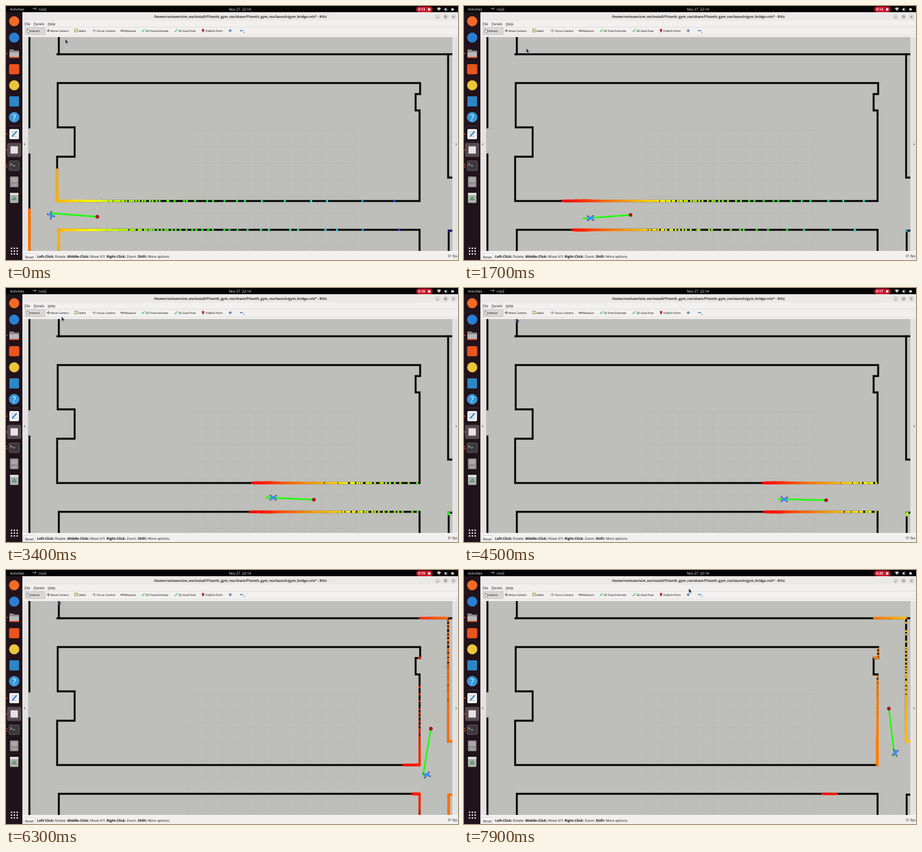
These frames come from a looping animation (800x450 px, 8 s). An HTML page with a canvas:

```html
<!DOCTYPE html>
<html lang="en">
<head>
<meta charset="utf-8">
<title>Lidar simulation</title>
<style>
html, body { margin: 0; width: 100%; height: 100%; overflow: hidden; background: #000; }
svg, canvas { position: absolute; left: 0; top: 0; width: 800px; height: 450px; }
text { font-family: "Open Sans", "Noto Sans", sans-serif; text-rendering: geometricPrecision; white-space: pre; }
.bar { font-size: 6.2px; fill: #f2f2f2; }
.menu { font-size: 6.2px; fill: #111; }
.tool { font-size: 4.95px; fill: #000; }
.status { font-size: 6.08px; fill: #111; }
.b { font-weight: 700; }
</style>
</head>
<body>
<svg viewBox="0 0 800 450">
  <!-- desktop bar -->
  <rect width="800" height="450" fill="#050404"/>
  <text class="bar" x="7" y="8">Activities</text>
  <path d="M47 4.5h6M51 2.5l2.5 2-2.5 2.5" stroke="#bbb" stroke-width=".8" fill="none"/>
  <text class="bar" x="58" y="8">rviz2</text>
  <text class="bar" x="414" y="8" text-anchor="middle">Nov 27  22:14</text>
  <rect x="726" y="1" width="29" height="10" rx="5" fill="#c9162b"/>
  <text id="timer" class="bar b" x="729.5" y="8.2">0:13</text>
  <rect x="747" y="4" width="4" height="4" rx=".6" fill="#fff"/>
  <g fill="#ccc">
    <path d="M762.5 4q3.8-3 7.6 0l-3.8 4.6z"/>
    <path d="M776 4.5h1.6l2-2v7l-2-2H776zM781 4q1.5 2 0 4"/>
    <path d="M788 4h4v4h-4zM792 5h1v2h-1z"/>
  </g>

  <!-- dock -->
  <rect y="11" width="29" height="439" fill="#21131b"/>
  <rect x="2" y="242.5" width="25" height="25" rx="3" fill="#574a51"/>
  <circle cx="14.5" cy="27" r="9" fill="#f26a26"/>
  <circle cx="14.5" cy="56" r="9" fill="#2b7fd0"/>
  <path d="M6 77h7l2 2h8v13H6z" fill="#8a8789"/><path d="M6 82h17v10H6z" fill="#b9b6b7"/><path d="M6 90h17v2H6z" fill="#e2582a"/>
  <rect x="5.5" y="103" width="18" height="18" rx="3" fill="#e9541f"/>
  <circle cx="14.5" cy="140.5" r="9" fill="#e9c63a"/>
  <rect x="6" y="160" width="17" height="18" rx="1" fill="#2d86c5"/>
  <circle cx="14.5" cy="197" r="9.3" fill="#3a97d8"/>
  <text x="14.5" y="202.5" font-size="15" fill="#fff" text-anchor="middle">?</text>
  <path d="M5 212.5h19" stroke="#54454d" stroke-width=".8"/>
  <rect x="6" y="218" width="17" height="18" rx="2" fill="#f1f1f1"/>
  <path d="M9 223h8M9 227h6M9 231h10" stroke="#b7b7b7"/><path d="M11 231l8-9" stroke="#3583d6" stroke-width="2.5"/>
  <rect x="8" y="248.5" width="13" height="13" fill="#e4e2e3"/>
  <rect x="5.5" y="274.5" width="18" height="17" rx="2" fill="#3b383b" stroke="#777278" stroke-width=".8"/>
  <path d="M8 279l2.5 1.7L8 282.5M12 283h4" stroke="#eee" fill="none"/>
  <rect x="7" y="302" width="15" height="19" rx="1.5" fill="#8e8b8d"/><rect x="9" y="304" width="11" height="8" fill="#aaa7a9"/>
  <text x="14.5" y="318.5" font-size="5" fill="#ddd" text-anchor="middle">SSD</text>
  <rect x="7" y="331" width="15" height="18" rx="2" fill="#a9b0aa"/><path d="M7 331h15v4H7z" fill="#dedfdc"/>
  <path d="M11.5 343l3-5 3 5z" fill="none" stroke="#3d8b59" stroke-width="1.4"/>
  <path d="M1.5 84h0M1.5 227h0M1.5 255h0M1.5 281h0M1.5 285h0" stroke="#e95420" stroke-width="2.2" stroke-linecap="round"/>
  <g id="apps" fill="#f4f4f4"></g>

  <!-- window -->
  <rect x="29" y="11" width="771" height="439" fill="#f1f0ef"/>
  <rect x="29" y="11" width="771" height="15" fill="#ebe9e8"/>
  <text class="b" x="414.5" y="21" font-size="5.97" fill="#2e2e2e" text-anchor="middle">/home/rovinam/sim_ws/install/f1tenth_gym_ros/share/f1tenth_gym_ros/launch/gym_bridge.rviz* - RViz</text>
  <path d="M764 19h0M778 19h0M792 19h0" stroke="#dcdad8" stroke-width="10" stroke-linecap="round"/>
  <path d="M762.5 20.5h3M776.5 17.5h3v3h-3zM790.5 17.5l3 3m0-3l-3 3" stroke="#555" stroke-width=".7" fill="none"/>
  <g class="menu"><text x="33" y="33.5">File</text><text x="49" y="33.5">Panels</text><text x="74" y="33.5">Help</text></g>
  <path d="M33 34.8h3M49 34.8h3.5M74 34.8h4" stroke="#222" stroke-width=".5"/>
  <path d="M29 37.5h771M29 51.5h771" stroke="#dad8d7" stroke-width=".7"/>
  <rect x="34" y="38" width="35.5" height="12.5" rx="1" fill="#d9d7d6" stroke="#bcbab9" stroke-width=".6"/>
  <g id="tools" class="tool"></g>
  <path d="M37 41v4l1.5 2h3v-4l-3-.5V41z" fill="#fff" stroke="#444" stroke-width=".6"/>
  <path d="M72 43.7h6M75 40.7v6" stroke="#777" stroke-width="1.5"/>
  <rect x="121.5" y="41" width="5" height="5" fill="#e8e8b0" stroke="#778b32" stroke-width=".8"/>
  <path d="M153 43.7h6.5M156.2 40.5V47" stroke="#888"/>
  <rect x="202.5" y="42.5" width="7" height="2.8" fill="#8d8d85"/>
  <path d="M240.5 46l5-4.5M298.5 46l5-4.5" stroke="#18cf2c" stroke-width="1.3"/>
  <path d="M348.7 47.500l-2-4a2.200 2.200 0 1 1 4 0z" fill="#b8232d"/>
  <path d="M394 43.7h5.6M396.8 41v5.5M414 43.7h5.6" stroke="#4d81b4" stroke-width="1.7"/>
  <path d="M420 46.5h2.400l-1.200 1.400z" fill="#444"/>
  <path d="M29 55h10v379H29zM790 55h10v379H790z" fill="#e4e3e1"/>
  <rect x="39" y="55" width="751" height="379" fill="#bebeba"/>
  <path d="M33.5 243v4l-2-2zM796 243v4l2-2z" fill="#555"/>
  <path d="M29 434.5h771" stroke="#fafafa"/>
  <rect x="31" y="438.5" width="20" height="10.5" rx="1.5" fill="#f7f6f5" stroke="#c7c5c3" stroke-width=".6"/>
  <text class="status" x="33.500" y="446.5">Reset</text>
  <text class="status" x="55" y="446"><tspan class="b">Left-Click:</tspan> Rotate. <tspan class="b">Middle-Click:</tspan> Move X/Y. <tspan class="b">Right-Click:</tspan> Zoom. <tspan class="b">Shift:</tspan> More options.</text>
  <text class="status" x="799" y="445" text-anchor="end">31 fps</text>
</svg>
<canvas id="view"></canvas>
<script>
const LOOP = 8000, STEP = 100, RAD = Math.PI / 180;
const BEAMS = 1080, FOV = 270 * RAD, RANGE = 885, LOOKAHEAD = 85;

// time, x, y
const ROUTE = [[0, 77, 367], [1000, 133, 385], [2300, 293, 370], [3400, 460, 371],
  [4500, 556, 374], [6300, 738, 365], [7900, 762, 330]];
const POINTER = [[0, 105, 59], [1400, 105, 59], [2300, 125.5, 122], [3400, 98.5, 51],
  [4300, 93, 54], [7000, 93, 54], [7800, 398, 33]];

// the line whose points the car chases
const RACELINE = [[60, 374], [218, 373], [380, 367], [542, 375], [752, 377], [752, 60]];

// corridor walls; some run on outside the view
const WALLS = [
  [[41.5, -200], [41.5, 215]],
  [[41.5, 263], [41.5, 470], [-50, 470], [-50, 900]],
  [[93.5, -200], [93.5, 85.5]],
  [[91, 85.5], [900, 85.5]],
  [[782.5, 85.5], [782.5, 304], [900, 304]],
  [[91.5, 136.5], [733, 136.5], [733, 156], [725, 156], [725, 185], [732, 185], [732, 345.5],
   [90.5, 345.5], [90.5, 267], [121.5, 267], [121.5, 215], [91.5, 215], [91.5, 136.5]],
  [[93.5, 900], [93.5, 396.5], [732, 396.5], [732, 900]],
  [[783.5, 900], [783.5, 398], [900, 398]]
];
const segments = line => line.slice(1).map((p, i) => [...line[i], ...p]);
const EDGES = WALLS.flatMap(segments);
const clamp = (v, lo, hi) => Math.max(lo, Math.min(hi, v));

// monotone cubic through timed points
function sample(rows, t) {
  const last = rows.length - 1;
  let i = 0;
  while (i < last - 1 && t >= rows[i + 1][0]) i++;
  const h = rows[i + 1][0] - rows[i][0], u = clamp((t - rows[i][0]) / h, 0, 1);
  return [1, 2].map(c => {
    const slope = j => (rows[j + 1][c] - rows[j][c]) / (rows[j + 1][0] - rows[j][0]);
    const tangent = j => {
      if (j === 0) return slope(0);
      if (j === last) return slope(last - 1);
      const a = slope(j - 1), b = slope(j);
      return a * b <= 0 ? 0 : 2 * a * b / (a + b);
    };
    const p = rows[i][c], q = rows[i + 1][c], v = u * u, w = v * u;
    return p * (2 * w - 3 * v + 1) + q * (3 * v - 2 * w)
      + h * (tangent(i) * (w - 2 * v + u) + tangent(i + 1) * (w - v));
  });
}

// leave the first corner, sway down the corridor, turn into the next one
function headingAt(t) {
  const leave = 55 * (1 - clamp(t / 1000, 0, 1)) ** 1.3;
  const sway = -3.5 * Math.sin(Math.PI * (clamp(t, 900, 4900) - 900) / 2000);
  const turn = -78 * clamp((t - 5300) / 2600, 0, 1) ** 1.7;
  return (leave + sway + turn) * RAD;
}

// furthest point of the race line at the lookahead distance
function goalFrom(x, y) {
  for (const [ax, ay, bx, by] of segments(RACELINE).reverse()) {
    const dx = bx - ax, dy = by - ay, fx = ax - x, fy = ay - y;
    const a = dx * dx + dy * dy, b = fx * dx + fy * dy;
    const s = (-b + Math.sqrt(b * b - a * (fx * fx + fy * fy - LOOKAHEAD ** 2))) / a;
    if (s >= 0 && s <= 1) return [ax + s * dx, ay + s * dy];
  }
}

// distance along a ray to the nearest wall
function cast(x, y, dx, dy) {
  let best = Infinity;
  for (const [ax, ay, bx, by] of EDGES) {
    const ex = bx - ax, ey = by - ay, det = dx * ey - dy * ex;
    if (Math.abs(det) < 1e-9) continue;
    const d = ((ax - x) * ey - (ay - y) * ex) / det;
    const s = ((ax - x) * dy - (ay - y) * dx) / det;
    if (d > 0 && d < best && s >= 0 && s <= 1) best = d;
  }
  return best;
}

// red, yellow, green, cyan, blue, magenta
const rainbow = v => `hsl(${clamp(v, 0, 1) * 300} 100% 50%)`;

function noise(n) {
  const s = Math.sin(n * 12.9898) * 43758.5453;
  return s - Math.floor(s) - 0.5;
}

const canvas = document.getElementById("view");
const ratio = window.devicePixelRatio || 1;
canvas.width = 800 * ratio;
canvas.height = 450 * ratio;
const g = canvas.getContext("2d");

function stroke(points, color, width) {
  g.strokeStyle = color;
  g.lineWidth = width;
  g.beginPath();
  points.forEach(p => g.lineTo(...p));
  g.stroke();
}

function drawMap() {
  const x = 322.5, y = 219.5, size = 295;
  for (let d = 0; d <= size; d += size / 10) {
    stroke([[x + d, y], [x + d, y + size]], "rgba(0,0,0,.035)", 1);
    stroke([[x, y + d], [x + size, y + d]], "rgba(0,0,0,.035)", 1);
  }
  g.lineCap = "square";
  WALLS.forEach(w => stroke(w, "#080808", 3.4));
  g.lineCap = "butt";
}

function drawScan(x, y, heading, seed) {
  const hits = [];
  for (let i = 0; i < BEAMS; i++) {
    const k = i + seed * 1.7;
    const a = heading + ((i + noise(k) * 0.8) / BEAMS - 0.5) * FOV;
    const dx = Math.cos(a), dy = Math.sin(a), d = cast(x, y, dx, dy);
    if (d > RANGE) continue;
    const r = d + noise(k + 0.5) * 1.6 + 0.4;
    hits.push([x + dx * r, y + dy * r]);
  }
  const near = Math.min(...hits.map(p => p[0])), far = x + RANGE;
  for (const [px, py] of hits) {
    g.fillStyle = rainbow((px - near) / (far - near));
    g.fillRect(px - 1.7, py - 1.7, 3.4, 3.4);
  }
}

function drawGoal(x, y) {
  g.beginPath();
  g.arc(x, y, 2.8, 0, 7);
  g.fillStyle = "#cf0a16";
  g.fill();
  g.strokeStyle = "#5e0a0c";
  g.lineWidth = 0.8;
  g.stroke();
}

function drawCar(x, y, heading) {
  g.save();
  g.translate(x, y);
  g.rotate(heading);
  g.fillStyle = "#18232f";
  for (const wx of [-4.8, 4.8]) for (const wy of [-3.8, 3.8]) g.fillRect(wx - 1.5, wy - 0.7, 3, 1.4);
  g.fillStyle = "#3f8fee";
  g.fillRect(-4.8, -3, 9.6, 6);
  g.restore();
}

function drawPointer(x, y) {
  g.save();
  g.translate(x, y);
  const arrow = new Path2D("M0 0v7.2l1.7-1.4 1.2 2.5 1.2-.6-1.1-2.3 2.2-.2z");
  g.fillStyle = "#10222c";
  g.fill(arrow);
  g.strokeStyle = "#8fb9cb";
  g.lineWidth = 0.6;
  g.stroke(arrow);
  g.restore();
}

function draw(t) {
  const [x, y] = sample(ROUTE, t), [px, py] = sample(ROUTE, t - STEP);
  const heading = headingAt(t), goal = goalFrom(x, y);
  // the body runs ahead of its last scan, more so at speed
  const lead = 4.5 + 0.7 * Math.hypot(x - px, y - py);
  g.setTransform(ratio, 0, 0, ratio, 0, 0);
  g.clearRect(0, 0, 800, 450);
  g.save();
  g.beginPath();
  g.rect(39, 55, 751, 379);
  g.clip();
  drawMap();
  drawScan(x, y, heading, t / STEP);
  stroke([[x, y], goal], "#1cff08", 2.8);
  drawGoal(...goal);
  drawCar(x + lead * Math.cos(heading), y + lead * Math.sin(heading), heading);
  g.restore();
  drawPointer(...sample(POINTER, t));
  timer.textContent = "0:" + (13 + Math.floor(t / 1000));
}

const timer = document.getElementById("timer");
const labels = { Interact: 42, "Move Camera": 79, Select: 128, "Focus Camera": 161, Measure: 210,
  "2D Pose Estimate": 247, "2D Goal Pose": 305, "Publish Point": 353 };
document.getElementById("tools").innerHTML =
  Object.entries(labels).map(([s, x]) => `<text x="${x}" y="45.6">${s}</text>`).join("");
document.getElementById("apps").innerHTML = Array.from({ length: 9 }, (_, i) =>
  `<rect x="${8.5 + i % 3 * 5}" y="${428 + Math.floor(i / 3) * 5}" width="2.6" height="2.6" rx=".8"/>`).join("");

const start = performance.now();
let shown = -1;
function tick() {
  const t = Math.floor((performance.now() - start) % LOOP / STEP) * STEP;
  if (t !== shown) draw(shown = t);
  requestAnimationFrame(tick);
}
tick();
</script>
</body>
</html>
```
